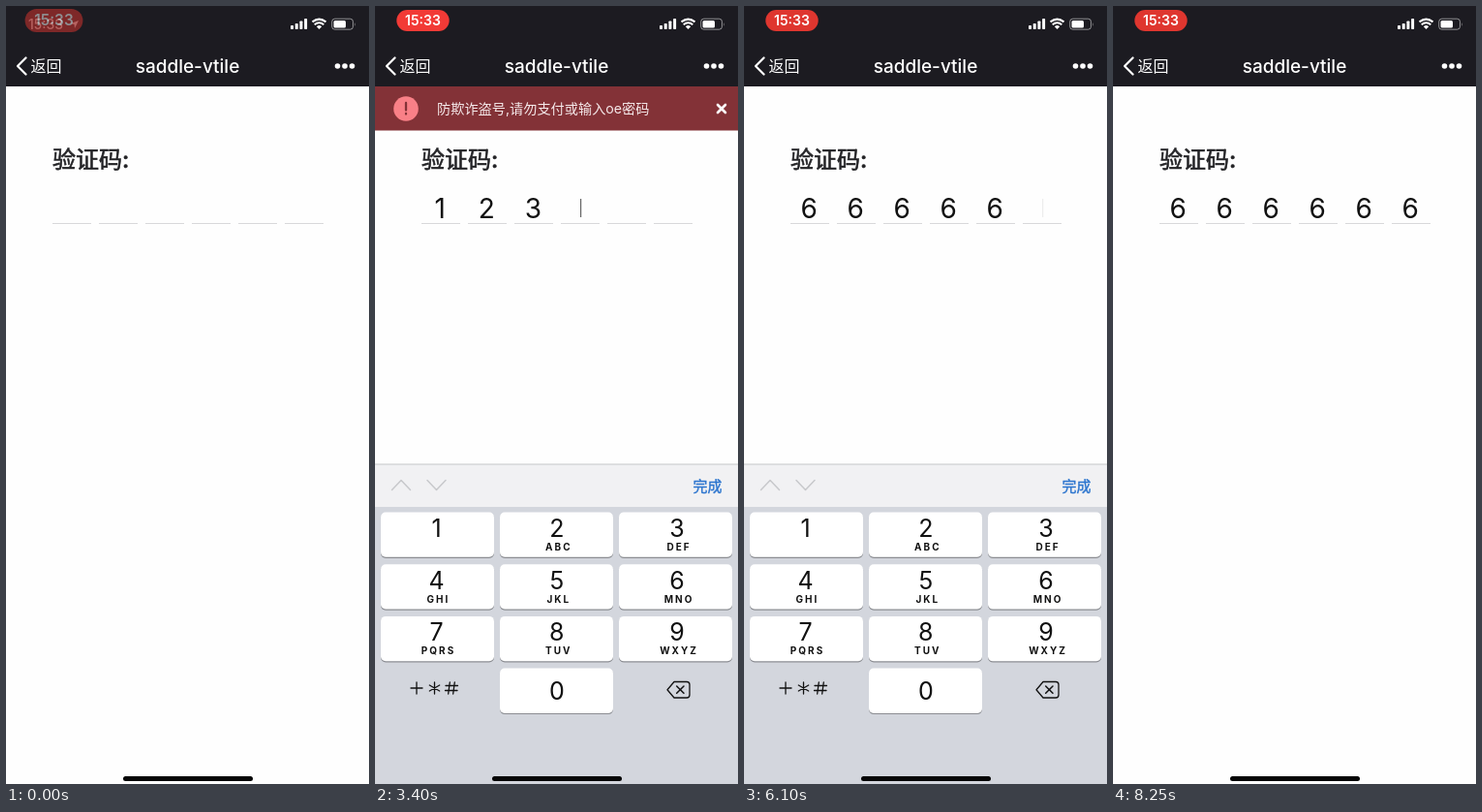
An HTML page that plays this animation: 375x803 px, repeating every 8300 ms.

```html
<!DOCTYPE html>
<html lang="zh-CN">
<head>
<meta charset="utf-8">
<style>
  html, body { margin: 0; width: 100%; height: 100%; overflow: hidden; background: #fefefe; }
  svg { display: block; width: 375px; height: 803px; }
  text { font-family: Inter, "Noto Sans CJK SC", "Noto Sans CJK", sans-serif; }
  .mid { text-anchor: middle; }
  .line { fill: none; stroke-linecap: round; stroke-linejoin: round; }
</style>
</head>
<body>
<svg viewBox="0 0 375 803">
  <rect width="375" height="803" fill="#fefefe"/>
  <text x="48" y="166.500" font-size="24" font-weight="500" fill="#232326" stroke="#232326" stroke-width=".6">验证码:</text>
  <g id="cells"></g>
  <rect id="caret" y="199" width="1.2" height="19" fill="#555"/>

  <g id="banner">
    <rect y="83" width="375" height="45.5" fill="#833237"/>
    <circle cx="32" cy="106" r="12.800" fill="#f98087"/>
    <path d="M32 100V107.500M32 111V111.500" class="line" stroke="#833237" stroke-width="2.300"/>
    <text x="64" y="111" font-size="14.2" fill="#f5e9ea">防欺诈盗号,请勿支付或输入oe密码</text>
    <path d="M354 102L362 110M362 102L354 110" class="line" stroke="#fff" stroke-width="2.6"/>
  </g>

  <rect width="375" height="83" fill="#1c1b21"/>
  <g id="clock" fill="#fff">
    <text x="23" y="24" font-size="14" font-weight="500">15:33</text>
    <path d="M67 18L75 15L71 23L70.500 19Z"/>
  </g>
  <g id="pill">
    <rect id="pillBox" x="22.300" y="4" width="54.400" height="22" rx="11"/>
    <text x="49.500" y="20" class="mid" font-size="14" font-weight="600" fill="#fff">15:33</text>
  </g>
  <g fill="#fff">
    <rect x="294" y="20" width="3" height="4" rx=".8"/>
    <rect x="298.700" y="18" width="3" height="6" rx=".8"/>
    <rect x="303.400" y="15.500" width="3" height="8.500" rx=".8"/>
    <rect x="308.100" y="13" width="3" height="11" rx=".8"/>
    <path d="M323.500 24L320.800 21.200Q323.500 19 326.200 21.200Z"/>
    <rect x="338.500" y="15" width="12.500" height="7.500" rx="1.500"/>
    <path d="M360 17V21Q361.500 19 360 17Z" opacity=".5"/>
  </g>
  <g fill="none" stroke="#fff">
    <path d="M318.700 19.200Q323.500 15.200 328.300 19.200M316.500 16.400Q323.500 10.800 330.500 16.400" stroke-width="2"/>
    <rect x="336.700" y="13.200" width="21.800" height="11" rx="3" opacity=".5"/>
  </g>
  <path d="M20.500 53.500L12 62L20.500 70.500" class="line" stroke="#fff" stroke-width="2.3"/>
  <text x="25.500" y="68" font-size="16" fill="#fff">返回</text>
  <text x="187.500" y="68.500" class="mid" font-size="19" font-weight="500" fill="#fff">saddle-vtile</text>
  <g fill="#fff">
    <circle cx="342.500" cy="62" r="2.800"/>
    <circle cx="350" cy="62" r="2.800"/>
    <circle cx="357.500" cy="62" r="2.800"/>
  </g>

  <g id="board">
    <rect y="473" width="375" height="330" fill="#d3d6dd"/>
    <rect y="473" width="375" height="44" fill="#f1f1f3"/>
    <rect y="472.500" width="375" height="1" fill="#c6c7ca"/>
    <path d="M17.500 499.500L27 489.500L36.500 499.500M54 489.500L63.500 499.500L73 489.500" class="line" stroke="#c8c9cc" stroke-width="1.500"/>
    <text id="done" x="328.500" y="501" font-size="15" font-weight="500" stroke-width=".4">完成</text>
    <g id="keys"></g>
    <g class="line" stroke="#111" stroke-width="1.300">
      <path d="M37 704H49M43 698V710"/>
      <path d="M61.500 698V710M56.300 701L66.700 707M66.700 701L56.300 707"/>
      <path d="M77.300 698L75.700 710M82.300 698L80.700 710M73 701.500H85.500M72.500 706.500H85"/>
      <path d="M309 697.500H322Q325 697.500 325 700.500V711Q325 714 322 714H309L302 705.750Z"/>
      <path d="M311.700 702L319 709.300M319 702L311.700 709.300" stroke-width="1.500"/>
    </g>
  </g>
  <rect x="121" y="795" width="134" height="5" rx="2.500" fill="#050505"/>
</svg>
<script>
const LOOP = 8300;
const $ = id => document.getElementById(id);
const clamp = v => Math.min(1, Math.max(0, v));
const ramp = (t, from, to) => {
  const k = clamp((t - from) / (to - from));
  return k * k * (3 - 2 * k);
};
// Critically damped spring from 0 to 1
const spring = ms => {
  const w = Math.max(0, ms) * 0.0183;
  return 1 - (1 + w) * Math.exp(-w);
};
const mix = (a, b, k) => `rgb(${a.map((v, i) => Math.round(v + (b[i] - v) * k))})`;

// Moments at which the entered code changes
const entries = [
  [0, ''], [1800, '1'], [2600, '12'], [3100, '123'],
  [3700, '12'], [3950, '1'], [4200, ''], [4750, '6'],
  [5150, '66'], [5400, '666'], [5650, '6666'], [5900, '66666'], [6150, '666666']
];

const cellX = i => 48 + 48 * i;
$('cells').innerHTML = [0, 1, 2, 3, 4, 5].map(i =>
  `<rect x="${cellX(i)}" y="224" width="40" height="1" fill="#d8d8da"/>
   <text x="${cellX(i) + 19.3}" y="219" class="mid" font-size="28" fill="#111"></text>`).join('');
const digits = $('cells').querySelectorAll('text');

const letters = ['', 'ABC', 'DEF', 'GHI', 'JKL', 'MNO', 'PQRS', 'TUV', 'WXYZ'];
const key = (label, sub, col, row) => {
  const x = 6 + 123 * col, y = 522.5 + 53.7 * row, mid = 63.5 + 124.3 * col;
  return `<rect x="${x}" y="${y + 1}" width="117" height="46.5" rx="5" fill="#8b8d92"/>
    <rect x="${x}" y="${y}" width="117" height="46.3" rx="5" fill="#fff"/>
    <text x="${mid}" y="${y + (label === '0' ? 32 : 25.5)}" class="mid" font-size="25" fill="#111">${label}</text>
    <text x="${mid + 2}" y="${y + 39.5}" class="mid" font-size="10" font-weight="700" letter-spacing="2" fill="#111">${sub}</text>`;
};
$('keys').innerHTML =
  letters.map((sub, i) => key(String(i + 1), sub, i % 3, Math.floor(i / 3))).join('') + key('0', '', 1, 3);

const OPEN = 880, CLOSE = 6350;

function draw(t) {
  const code = entries.filter(e => e[0] <= t).pop()[1];
  digits.forEach((d, i) => d.textContent = code[i] || '');

  const focused = t >= OPEN && t < CLOSE && code.length < 6;
  $('caret').setAttribute('x', cellX(code.length) + 20);
  $('caret').setAttribute('opacity', focused ? Math.sin(Math.PI * t / 1000) ** 2 : 0);

  const shown = spring(t - OPEN) - spring(t - CLOSE);
  $('board').setAttribute('transform', `translate(0 ${332 * (1 - shown)})`);
  const tint = mix([108, 109, 114], [43, 116, 206], ramp(t, 1250, 1500));
  $('done').setAttribute('fill', tint);
  $('done').setAttribute('stroke', tint);

  const warn = ramp(t, 1750, 2050) - ramp(t, 4300, 4600);
  $('banner').setAttribute('transform', `translate(0 ${-46 * (1 - warn)})`);

  const settle = ramp(t, -250, 250), scale = 1.2 - 0.2 * settle;
  $('clock').setAttribute('opacity', 1 - settle);
  $('pill').setAttribute('opacity', settle);
  $('pill').setAttribute('transform', `translate(49.5 15) scale(${scale}) translate(-49.5 -15)`);
  const glow = ramp(t, 1200, 2300) - ramp(t, 3500, 5000);
  $('pillBox').setAttribute('fill', mix([223, 54, 47], [242, 58, 54], glow));
}

const start = performance.now();
function tick() {
  draw((performance.now() - start) % LOOP);
  requestAnimationFrame(tick);
}
tick();
</script>
</body>
</html>
```
